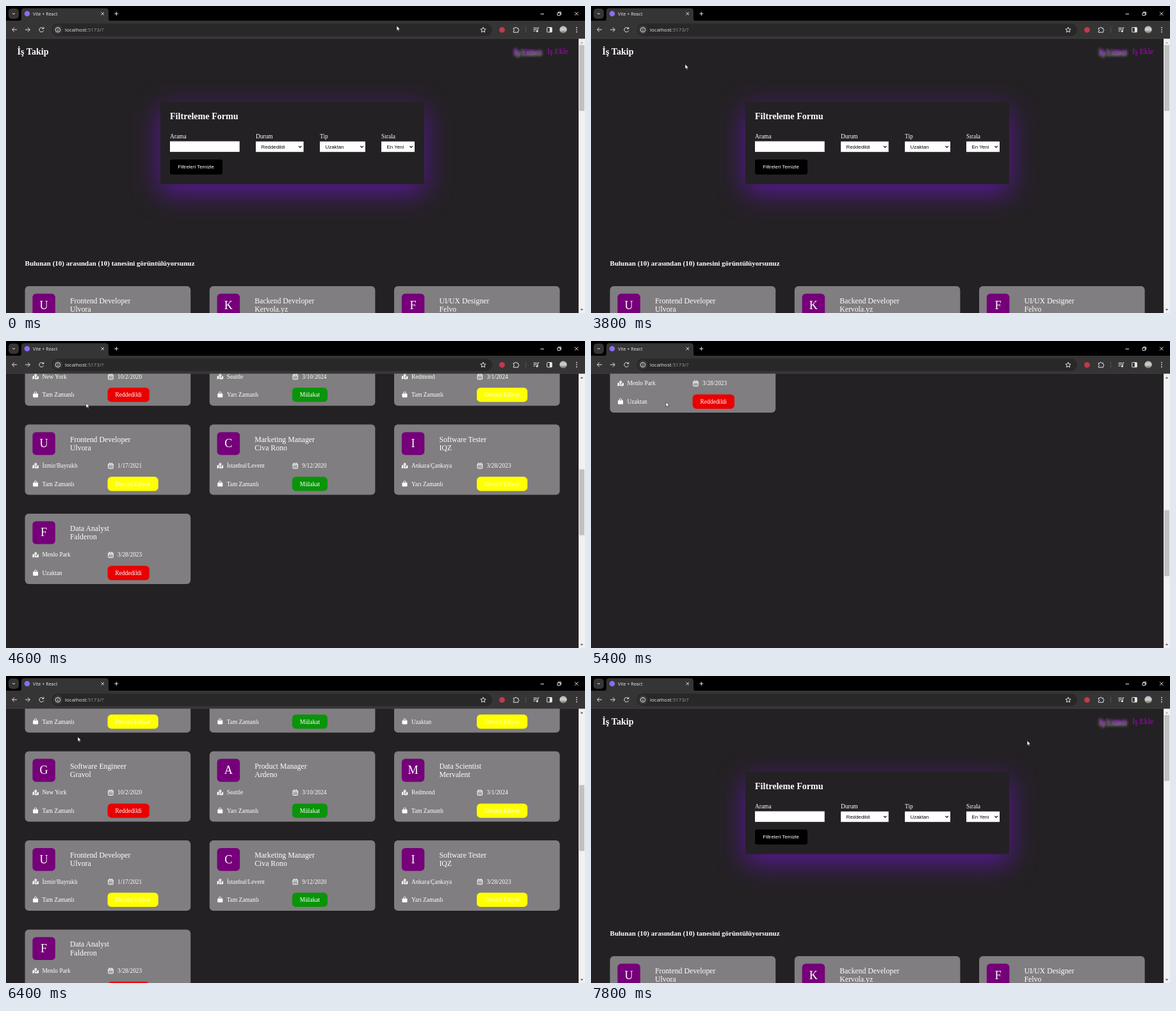
Write an HTML page that moves like this. It is 904 px wide and 480 px high and loops after 8 s.

```html
<!DOCTYPE html>
<html lang="tr">
<head>
<meta charset="utf-8">
<title>İş Takip</title>
<style>
  html, body { margin: 0; width: 100%; height: 100%; overflow: hidden; background: #242124; }
  svg { display: block; width: 904px; height: 480px; }
  text { white-space: pre; }
  .serif { font-family: "Liberation Serif", "Times New Roman", serif; fill: #fff; }
  .ui { font-family: "Open Sans", "Noto Sans", sans-serif; fill: #e8e8e8; }
  .control { font-family: "Liberation Sans", Arial, sans-serif; font-size: 7.85px; }
  .bold { font-weight: bold; }
  .line { fill: none; stroke: #e6e6e6; stroke-width: 1; }
  .active { text-shadow: 2px 2px 4px #d8c8e0, 1px 2px 5px #bbb; }
</style>
</head>
<body>
<svg viewBox="0 0 904 480">
  <defs>
    <clipPath id="view"><rect y="51" width="894" height="429"/></clipPath>
    <filter id="blur" x="-30%" y="-80%" width="160%" height="260%" color-interpolation-filters="sRGB">
      <feGaussianBlur stdDeviation="21"/>
    </filter>
    <linearGradient id="portrait" x2="0" y2="1">
      <stop stop-color="#9fb4c4"/><stop offset=".5" stop-color="#d8d0c8"/><stop offset="1" stop-color="#6d6258"/>
    </linearGradient>
    <g id="map" fill="#fff">
      <path d="M0 4.3 2.5 3.2V8.2L0 9.2zM3.2 4.6 4.9 7.2 6.2 5.6V9.3L3.2 8.2zM6.9 5.2 9.4 3.6V8.2L6.9 9.3z"/>
      <path d="M4.8 6.2C3.6 4.5 2.9 3.5 2.9 2.3a1.9 1.9 0 0 1 3.8 0C6.7 3.5 6 4.5 4.8 6.2z"/>
      <circle cx="4.8" cy="2.3" r=".65" fill="#808080"/>
    </g>
    <g id="bag">
      <path d="M.5 3.3H8.5V8.2Q8.5 9.4 7.3 9.4H1.7Q.5 9.4 .5 8.2z" fill="#fff"/>
      <path d="M2.7 4.6V2.5a1.8 1.8 0 0 1 3.6 0V4.6" fill="none" stroke="#fff" stroke-width="1"/>
    </g>
    <g id="calendar" fill="none" stroke="#fff">
      <rect x=".6" y="1.6" width="7.6" height="7.4" rx=".8"/>
      <path d="M.6 3.5H8.2M2.7 0V2.2M6.1 0V2.2" stroke-width="1.1"/>
      <path d="M2 5.4H7M2 7.3H7" stroke-width=".9" stroke-dasharray="1.2 .7"/>
    </g>
  </defs>

  <rect width="904" height="480" fill="#242124"/>
  <g clip-path="url(#view)"><g id="page"></g></g>

  <g id="scrollbar">
    <rect x="894" y="51" width="10" height="429" fill="#f1f1f1"/>
    <rect id="thumb" x="895" y="61" width="8" height="103" fill="#c1c1c1"/>
    <path id="up" d="M896.8 58.4H901.2L899 56z"/>
    <path d="M896.8 473.8H901.2L899 476.2z" fill="#505050"/>
  </g>

  <g id="browser">
    <rect width="904" height="24" fill="#000"/>
    <rect y="23" width="904" height="28" fill="#353535"/>
    <rect y="50.4" width="904" height=".8" fill="#444"/>
    <path d="M20 23.5Q24 23.5 24 19V8Q24 3.5 28.5 3.5H155.5Q160 3.5 160 8V19Q160 23.5 164 23.5z" fill="#353535"/>
    <rect x="4" y="4" width="16" height="16" rx="5" fill="#353535"/>
    <path class="line" d="M10 11 12 13 14 11"/>
    <circle cx="33" cy="12" r="4.3" fill="#8b6cf2"/>
    <text class="ui" x="42" y="14.6" font-size="7.1">Vite + React</text>
    <path class="line" d="M148.6 9.8 153 14.2M153 9.8 148.6 14.2M169.3 12H175.3M172.3 9V15"/>
    <path class="line" d="M834.5 12.5H840M888 9.3 893.4 14.7M893.4 9.3 888 14.7"/>
    <path class="line" stroke-width=".9" d="M861 10.8H865.2V14.8H861zM862.4 10.6V9.4H866.5V13.4H865.4"/>

    <path class="line" stroke-width="1.2" d="M17 37H9.8M13 33.6 9.6 37 13 40.4M30 37H37.2M34 33.6 37.4 37 34 40.4"/>
    <path class="line" stroke-width="1.2" d="M58.2 35A3.5 3.5 0 1 0 58.7 38.3M58.9 33V35.6H56.2"/>
    <rect x="71.5" y="27.5" width="687.5" height="19.5" rx="9.7" fill="#282828"/>
    <circle cx="81" cy="37.2" r="7.3" fill="#383838"/>
    <circle class="line" cx="81" cy="37.2" r="3.7"/>
    <path class="line" d="M81 36.7V39.3M81 35V36"/>
    <text class="ui" x="92" y="40.2" font-size="8">localhost<tspan fill="#9c9c9c">:5173/?</tspan></text>
    <path class="line" d="M745 33.2 746.2 35.9 749.1 36.2 746.9 38.1 747.6 41 745 39.5 742.4 41 743.1 38.1 740.9 36.2 743.8 35.9z"/>
    <circle cx="774.5" cy="37.3" r="4.4" fill="#c23a4c"/>
    <path class="line" stroke-width="1.2" d="M792.3 34.5H794.6A1.3 1.3 0 0 1 797.2 34.5H799.6V36.6A1.3 1.3 0 0 1 799.6 39.2V41.2H792.3V39.2A1.3 1.3 0 0 0 792.3 36.6z"/>
    <path d="M811.5 32.5V41.5" stroke="#555"/>
    <path class="line" d="M823.5 34.3H829M823.5 36.7H829M823.5 39.1H826.4M830.3 39.4V34H832.4"/>
    <circle cx="829.2" cy="39.5" r="1.5" fill="#e6e6e6"/>
    <rect class="line" x="844.7" y="33.5" width="7.6" height="7.4" rx=".8"/>
    <rect x="848.8" y="33.5" width="3.5" height="7.4" fill="#e6e6e6"/>
    <circle cx="870" cy="37" r="5.7" fill="url(#portrait)"/>
    <g fill="#e6e6e6"><circle cx="891" cy="33.7" r=".9"/><circle cx="891" cy="37.1" r=".9"/><circle cx="891" cy="40.5" r=".9"/></g>
  </g>

  <path id="cursor" d="M0 0V7.4L1.8 5.8 2.9 8.4 4.1 7.9 3 5.4H5.2z" fill="#fff" stroke="#111" stroke-width=".5"/>
</svg>

<script>
const $ = id => document.getElementById(id);
const text = (x, y, size, str, extra = 'class="serif"') =>
  `<text x="${x}" y="${y}" font-size="${size}" ${extra}>${str}</text>`;
const box = (x, y, w, h, fill, r = 0) =>
  `<rect x="${x}" y="${y}" width="${w}" height="${h}" rx="${r}" fill="${fill}"/>`;
const icon = (id, x, y) => `<use href="#${id}" x="${x}" y="${y}"/>`;

const BODY = 9.416, TITLE = 11.77, HEADING = 14.12;
const BOLD = 'class="serif bold"';

// Status: pill colour and width
const STATUS = {
  'Reddedildi': ['#ea0000', 65.4],
  'Mülakat': ['#0a940a', 55.2],
  'Devam Ediyor': ['#ffff00', 79.2]
};
const FULL = 'Tam Zamanlı', HALF = 'Yarı Zamanlı', REMOTE = 'Uzaktan';
const NO = 'Reddedildi', MEET = 'Mülakat', OPEN = 'Devam Ediyor';

const JOBS = [
  ['Frontend Developer', 'Ulvora', 'İzmir/Bayraklı', '1/17/2021', FULL, OPEN],
  ['Backend Developer', 'Kervola.yz', 'İstanbul/Levent', '9/12/2020', FULL, MEET],
  ['UI/UX Designer', 'Felvo', 'Ankara/Çankaya', '3/28/2023', REMOTE, OPEN],
  ['Software Engineer', 'Gravol', 'New York', '10/2/2020', FULL, NO],
  ['Product Manager', 'Ardeno', 'Seattle', '3/10/2024', HALF, MEET],
  ['Data Scientist', 'Mervalent', 'Redmond', '3/1/2024', FULL, OPEN],
  ['Frontend Developer', 'Ulvora', 'İzmir/Bayraklı', '1/17/2021', FULL, OPEN],
  ['Marketing Manager', 'Civa Rono', 'İstanbul/Levent', '9/12/2020', FULL, MEET],
  ['Software Tester', 'IQZ', 'Ankara/Çankaya', '3/28/2023', HALF, OPEN],
  ['Data Analyst', 'Falderon', 'Menlo Park', '3/28/2023', REMOTE, NO]
];

function card([role, firm, place, date, type, status], i) {
  const x = 29.6 + (i % 3) * 288.2, y = 438 + Math.floor(i / 3) * 139.3;
  const [colour, width] = STATUS[status];
  return `<g transform="translate(${x} ${y})">` +
    box(0, 0, 258.6, 110, '#807e80', 5.9) +
    box(11.8, 11.8, 35.5, 35.8, '#750079', 5.5) +
    text(29.5, 35.6, 18.2, firm[0], 'class="serif" text-anchor="middle"') +
    text(70.4, 27, TITLE, role) + text(70.4, 40.2, TITLE, firm) +
    icon('map', 11.9, 59.6) + text(26.9, 67.5, BODY, place) +
    icon('calendar', 129.5, 59.7) + text(144.5, 67.5, BODY, date) +
    icon('bag', 12, 87.6) + text(26.9, 96.2, BODY, type) +
    box(129, 81.7, width, 22.3, colour, 5.9) + text(141, 96.2, BODY, status) + '</g>';
}

const select = (x, w, label, value) =>
  text(x, 207, BODY, label) + box(x, 211.8, w, 16.4, '#fff') +
  text(x + 8.6, 222.6, 7.85, value, 'class="control"') +
  `<path d="M${x + w - 7.6} 219 l2.2 2.2 2.2 -2.2" fill="none" stroke="#111" stroke-width="1.1"/>`;

$('page').innerHTML =
  text(17.6, 76, HEADING, 'İş Takip', BOLD) +
  text(792, 75, TITLE, 'İş Listesi', 'class="serif active" style="fill:#8a00c4"') +
  text(845, 75, TITLE, 'İş Ekle', 'class="serif" style="fill:#b000c4"') +
  '<rect x="241" y="163" width="412" height="128.5" fill="#5a189a" filter="url(#blur)"/>' +
  box(241, 150, 412, 128.5, '#242124') +
  text(256, 177, HEADING, 'Filtreleme Formu', BOLD) +
  text(256, 207, BODY, 'Arama') + box(256, 211.5, 108.7, 16.6, '#fff') +
  select(390, 74.6, 'Durum', 'Reddedildi') +
  select(490, 71, 'Tip', 'Uzaktan') +
  select(586, 52, 'Sırala', 'En Yeni') +
  box(256, 240, 82, 23.6, '#000', 3.5) +
  text(268.4, 254.3, 7.85, 'Filtreleri Temizle', 'class="control" fill="#fff"') +
  text(29.6, 406.2, 11.01, 'Bulunan (10) arasından (10) tanesini görüntülüyorsunuz', BOLD) +
  JOBS.map(card).join('');

const LOOP = 8000, STEP = 200;
// [time, value...] with straight runs between entries
const POINTER = [
  [0, 610, 31], [200, 610, 31], [400, 590, 20], [600, 540, 9], [800, 470, 14], [1000, 400, 22],
  [1200, 400, 22], [1800, 251, 26], [2400, 218, 23], [2600, 205, 32], [3000, 176, 70],
  [3400, 176, 70], [3800, 147, 91], [4600, 125, 97], [4800, 125, 97], [5400, 117, 95.5],
  [6400, 112, 95], [6800, 330, 90], [7200, 610, 96], [7400, 610, 96], [7800, 681, 101], [LOOP, 681, 101]
];
const SCROLL = [
  [0, 0], [3800, 0], [4000, 100], [4200, 290], [4400, 460], [4600, 586], [4800, 586],
  [5400, 854], [5800, 1090], [6000, 1116], [6200, 830], [6400, 459.5],
  [6600, 160], [6800, 0], [LOOP, 0]
];

function sample(track, t) {
  const i = track.findIndex(k => k[0] > t);
  const a = track[i - 1], b = track[i];
  const p = (t - a[0]) / (b[0] - a[0]);
  return a.slice(1).map((v, n) => v + (b[n + 1] - v) * p);
}

function draw() {
  const t = Math.floor(performance.now() % LOOP / STEP) * STEP;
  const [x, y] = sample(POINTER, t), [scroll] = sample(SCROLL, t);
  $('cursor').setAttribute('transform', `translate(${x} ${y})`);
  $('page').setAttribute('transform', `translate(0 ${-scroll})`);
  $('thumb').setAttribute('y', 61 + scroll * .2383);
  $('up').setAttribute('fill', scroll ? '#505050' : '#a3a3a3');
  requestAnimationFrame(draw);
}
draw();
</script>
</body>
</html>
```
